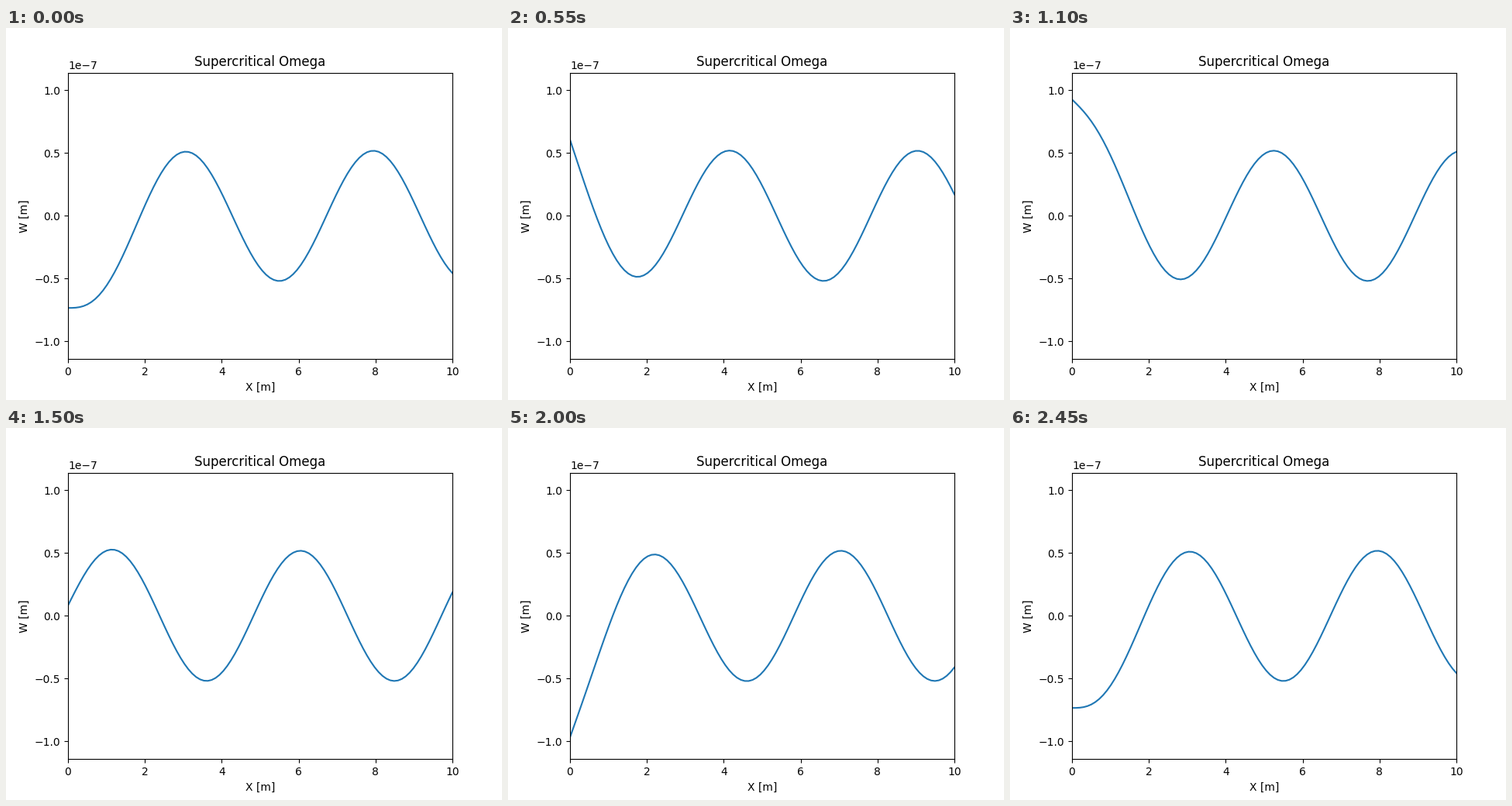
Animation, 640 px wide and 480 px high, one loop 2.5 s. Source, as a matplotlib script:

```python
import numpy as np
import matplotlib.pyplot as plt
from matplotlib.animation import FuncAnimation

FRAMES = 50
K = 1.2855         # wave number [1/m]
AMP = 0.5185e-7    # amplitude of the travelling wave [m]
PHASE = -3 * np.pi / 4

x = np.linspace(0, 10, 100)


def deflection(i):
    """Travelling wave plus the decaying field near the loaded end."""
    angle = 2 * np.pi * i / (FRAMES - 1) + PHASE
    return AMP * (np.cos(angle - K * x) + np.exp(-K * x) * np.cos(angle))


plt.rcParams["font.family"] = "DejaVu Sans"
fig, ax = plt.subplots(figsize=(6.4, 4.8), dpi=100)
line, = ax.plot(x, deflection(0), color="#1f77b4", lw=1.5)
ax.set_xlim(0, 10)
ax.set_ylim(-2.2 * AMP, 2.2 * AMP)
ax.set_title("Supercritical Omega")
ax.set_xlabel("X [m]")
ax.set_ylabel("W [m]")


def update(i):
    line.set_ydata(deflection(i))
    return line,


anim = FuncAnimation(fig, update, frames=FRAMES, interval=50, repeat=True)
plt.show()
```
